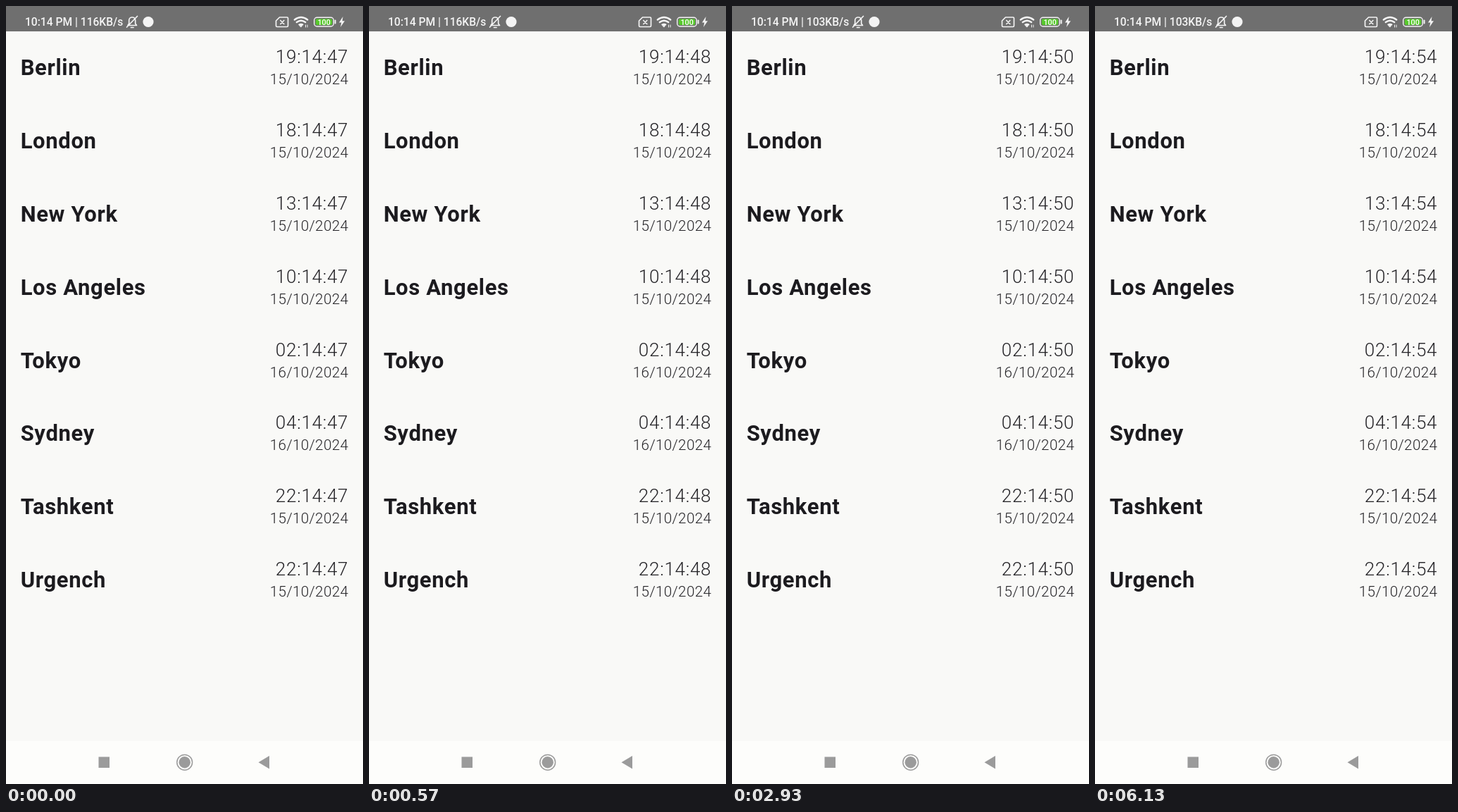
Write an HTML page that moves like this. It is 507 by 1104 pixels and loops after 6.43 s.

```html
<!DOCTYPE html>
<html lang="en">
<head>
<meta charset="utf-8">
<title>World clock</title>
<style>
  html, body { margin: 0; width: 100%; height: 100%; overflow: hidden; background: #f9f9f7; }
  svg { display: block; width: 507px; height: 1104px; }
  text { font-family: Roboto, sans-serif; white-space: pre; }
  .city { font-size: 31px; font-weight: 700; letter-spacing: .65px; fill: #1c1b1f; }
  .time, .date { font-weight: 300; fill: #242327; text-anchor: end; }
  .time { font-size: 26px; letter-spacing: .75px; }
  .date { font-size: 20.65px; letter-spacing: .35px; }
  .status { font-size: 15.6px; font-weight: 500; fill: #f4f4f4; }
  .line { fill: none; stroke: #f4f4f4; stroke-width: 1.7; stroke-linecap: round; stroke-linejoin: round; }
</style>
</head>
<body>
<svg viewBox="0 0 507 1104">
  <rect width="507" height="1104" fill="#f9f9f7"/>
  <rect width="507" height="36" fill="#6f6f6f"/>

  <text class="status" id="status" x="27" y="28"></text>
  <path class="line" d="M173 27.5h12.500l-1.800-2.500v-4.500c0-6-9-6-9 0v4.500zM177.500 30.500h3.500M186.500 14.500l-15 15.500"/>
  <circle cx="202" cy="22.5" r="7.6" fill="#f4f4f4"/>

  <g class="line">
    <path d="M388.5 16h10.5q1.5 0 1.5 1.5v10.5q0 1.5-1.5 1.5h-14q-1.5 0-1.5-1.5v-7z"/>
    <path d="M389.8 20.5l5 5m0-5l-5 5"/>
    <path d="M409.8 19.5q9.2-7 18.400 0M412.800 23q6.200-4.600 12.400 0" stroke-width="2.400"/>
    <path d="M415.800 26q3.200-2 6.400 0l-3.200 3.800z" fill="#f4f4f4" stroke-width="1"/>
    <path d="M425.500 27v3m2.500-3v3" stroke-width="1"/>
  </g>
  <rect x="437.7" y="16.2" width="27.6" height="12.8" rx="4" fill="none" stroke="#f4f4f4" stroke-width="1.4"/>
  <rect x="439.8" y="18.2" width="23.4" height="8.8" rx="2.2" fill="#57c82c"/>
  <path d="M467.6 20.5v4" stroke="#f4f4f4" stroke-width="2" stroke-linecap="round"/>
  <text x="451.6" y="26.5" font-size="10.8" font-weight="500" fill="#fff" text-anchor="middle">100</text>
  <path d="M478.5 15l-5.5 8.5h3.3l-1.3 6.5 6-8.8h-3.4z" fill="#f4f4f4"/>

  <g id="rows"></g>

  <rect y="1043" width="507" height="61" fill="#fdfdfb"/>
  <g fill="#9b9b9b">
    <rect x="131.5" y="1065.5" width="15.5" height="15.5"/>
    <circle cx="253.7" cy="1073.3" r="8.2"/>
    <circle cx="253.7" cy="1073.3" r="10.9" fill="none" stroke="#9b9b9b" stroke-width="1.5"/>
    <path d="M358.5 1073.3l15.5-9.300v18.600z"/>
  </g>
</svg>
<script>
  const LOOP = 6430;
  const TICKS = [30, 1030, 2070, 3070, 4070, 5100, 6130];
  const RATE_CHANGE = 2070;
  const ROW_HEIGHT = 103.85;
  const cities = [
    ['Berlin', '19', 15], ['London', '18', 15], ['New York', '13', 15], ['Los Angeles', '10', 15],
    ['Tokyo', '02', 16], ['Sydney', '04', 16], ['Tashkent', '22', 15], ['Urgench', '22', 15]
  ];
  const rows = document.getElementById('rows');
  const status = document.getElementById('status');

  function addText(className, x, y, content) {
    const node = document.createElementNS(rows.namespaceURI, 'text');
    node.setAttribute('class', className);
    node.setAttribute('x', x);
    node.setAttribute('y', Math.round(y));
    node.textContent = content;
    return rows.appendChild(node);
  }

  const clocks = cities.map(([name, hour, day], i) => {
    const y = i * ROW_HEIGHT;
    addText('city', 20.65, y + 98.2, name);
    addText('date', 486.3, y + 111.2, `${day}/10/2024`);
    return { hour, node: addText('time', 486.3, y + 81.2, '') };
  });

  function setText(node, content) {
    if (node.textContent !== content) node.textContent = content;
  }

  function draw() {
    const t = performance.now() % LOOP;
    const second = 47 + TICKS.filter(tick => t >= tick).length;
    for (const { hour, node } of clocks) setText(node, `${hour}:14:${second}`);
    setText(status, `10:14 PM | ${t < RATE_CHANGE ? 116 : 103}KB/s`);
    requestAnimationFrame(draw);
  }
  draw();
</script>
</body>
</html>
```
